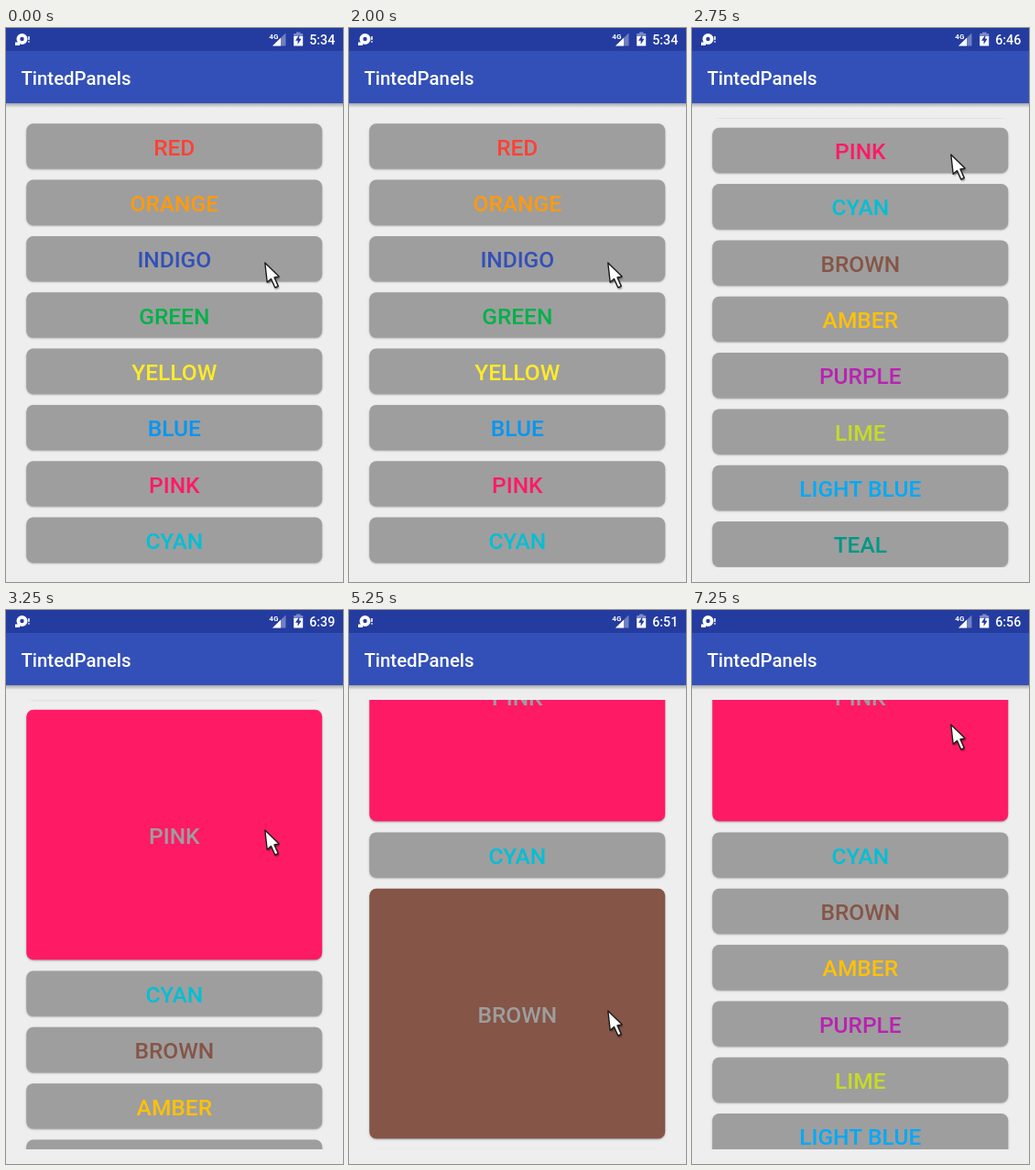
Animation of 368 by 604 pixels, one loop 8 s. Source, as an HTML page with a canvas:

```html
<!DOCTYPE html>
<html lang="en">
<head>
<meta charset="utf-8">
<style>
html, body { margin: 0; width: 100%; height: 100%; overflow: hidden; background: #eee; }
canvas { display: block; }
</style>
</head>
<body>
<canvas id="stage" width="368" height="604"></canvas>
<script>
const c = document.getElementById('stage').getContext('2d');
const LOOP = 8000, PITCH = 61.33, LOW = 49.07, HIGH = 272.5, TOP = 104.27;
const GREY = '#9e9e9e', BAR = '#3350b8', DARK = '#243c9f';

const buttons = [
  ['RED', '#ff4136'], ['ORANGE', '#ff9a0e'], ['INDIGO', BAR], ['GREEN', '#00b14a'],
  ['YELLOW', '#ffeb2a'], ['BLUE', '#0096f5'], ['PINK', '#ff1a66'], ['CYAN', '#00bfd5'],
  ['BROWN', '#855547'], ['AMBER', '#ffc107'], ['PURPLE', '#b922b2'], ['LIME', '#c5dc26'],
  ['LIGHT BLUE', '#00a9f7'], ['TEAL', '#009787']
];

// from (ms), clock, scroll offset, open buttons, pointer tip
const scenes = [
  [0, '5:34', 0, [], [282, 255]],
  [1000, '6:19', 0, ['INDIGO'], [274, 358]],
  [2000, '5:34', 0, [], [282, 255]],
  [2500, '5:42', 57.1, [], null],
  [2750, '6:46', 363.5, [], [282, 137]],
  [3250, '6:39', 363.5, ['PINK'], [282, 239]],
  [4250, '6:39', 363.5, ['PINK'], [282, 476]],
  [5250, '6:51', 514.6, ['PINK', 'BROWN'], [282, 436]],
  [6250, '6:56', 514.6, ['PINK'], [282, 332]],
  [7250, '6:56', 514.6, ['PINK'], [282, 124]]
];

function text(str, x, y, size, color, align = 'left', weight = 500) {
  c.font = `${weight} ${size}px Roboto, sans-serif`;
  c.textAlign = align;
  c.fillStyle = color;
  c.fillText(str, x, y);
}

function rect(x, y, w, h, color) {
  c.fillStyle = color;
  c.fillRect(x, y, w, h);
}

function shape(path, color) {
  c.fillStyle = color;
  c.fill(new Path2D(path));
}

function shadow(color, blur, dx, dy) {
  c.shadowColor = color;
  c.shadowBlur = blur;
  c.shadowOffsetX = dx;
  c.shadowOffsetY = dy;
}

function drawList(scroll, open) {
  c.save();
  c.beginPath();
  c.rect(0, 98, 368, 490);
  c.clip();
  let y = TOP - scroll;
  for (const [name, color] of buttons) {
    const isOpen = open.includes(name), h = isOpen ? HIGH : LOW;
    c.save();
    shadow('rgba(0,0,0,.35)', 2, 0, 1);
    c.fillStyle = isOpen ? color : GREY;
    c.beginPath();
    c.roundRect(22.3, y, 322.9, h, 7.5);
    c.fill();
    c.restore();
    text(name, 183.8, y + h / 2 + 9.8, 24.5, isOpen ? GREY : color, 'center');
    y += h + PITCH - LOW;
  }
  c.restore();
}

function drawBars(clock) {
  const g = c.createLinearGradient(0, 82, 0, 87);
  g.addColorStop(0, 'rgba(0,0,0,.3)');
  g.addColorStop(1, 'rgba(0,0,0,0)');
  rect(0, 82, 368, 5, g);
  rect(0, 0, 368, 82, BAR);
  rect(0, 0, 368, 25, DARK);
  text('TintedPanels', 16.4, 61.5, 20.4, '#fff');
  text(clock, 359.3, 18, 14.3, '#fff', 'right');

  // notification
  shape('M11.5 12a6 6 0 1 1 12 0a6 6 0 1 1 -12 0M10 15.5h5v3.5h-5z', '#fff');
  shape('M15.3 12a2.2 2.2 0 1 1 4.4 0a2.2 2.2 0 1 1 -4.4 0', DARK);
  rect(24.2, 9, 1.5, 4, '#fff');
  rect(24.2, 14.2, 1.5, 1.5, '#fff');

  // signal
  shape('M305.5 5.5V19.5H291z', 'rgba(255,255,255,.35)');
  shape('M300 10.8V19.5H291z', '#fff');
  text('4G', 287.3, 11.5, 8, '#fff', 'left', 700);

  // battery
  shape('M317 4.5h4.5v1.5h2.7v4h-10v-4h2.8z', 'rgba(255,255,255,.4)');
  rect(314.2, 9, 10, 10.5, '#fff');
  shape('M320.3 7.5L316 13.8h2.6v4L322.6 11.8h-2.3z', DARK);
}

function drawPointer([x, y]) {
  c.save();
  c.translate(x, y);
  const arrow = new Path2D('M.8 1L3.2 22.2L7.4 18.4L11.8 28L15.3 26.4L11 17L16.2 16z');
  shadow('rgba(0,0,0,.5)', 2, 1, 2);
  c.fillStyle = '#fff';
  c.fill(arrow);
  shadow('transparent', 0, 0, 0);
  c.strokeStyle = '#1c1c1c';
  c.lineWidth = 1.4;
  c.lineJoin = 'round';
  c.stroke(arrow);
  c.restore();
}

function frame(now) {
  const t = now % LOOP;
  let [from, clock, scroll, open, tip] = scenes.findLast(s => s[0] <= t);
  // one row every 50 ms
  if (from === 2500) scroll += PITCH * Math.floor((t - from) / 50);
  rect(0, 0, 368, 604, '#eee');
  drawList(scroll, open);
  drawBars(clock);
  if (tip) drawPointer(tip);
}

const start = performance.now();
function tick() {
  frame(performance.now() - start);
  requestAnimationFrame(tick);
}
tick();
</script>
</body>
</html>
```
